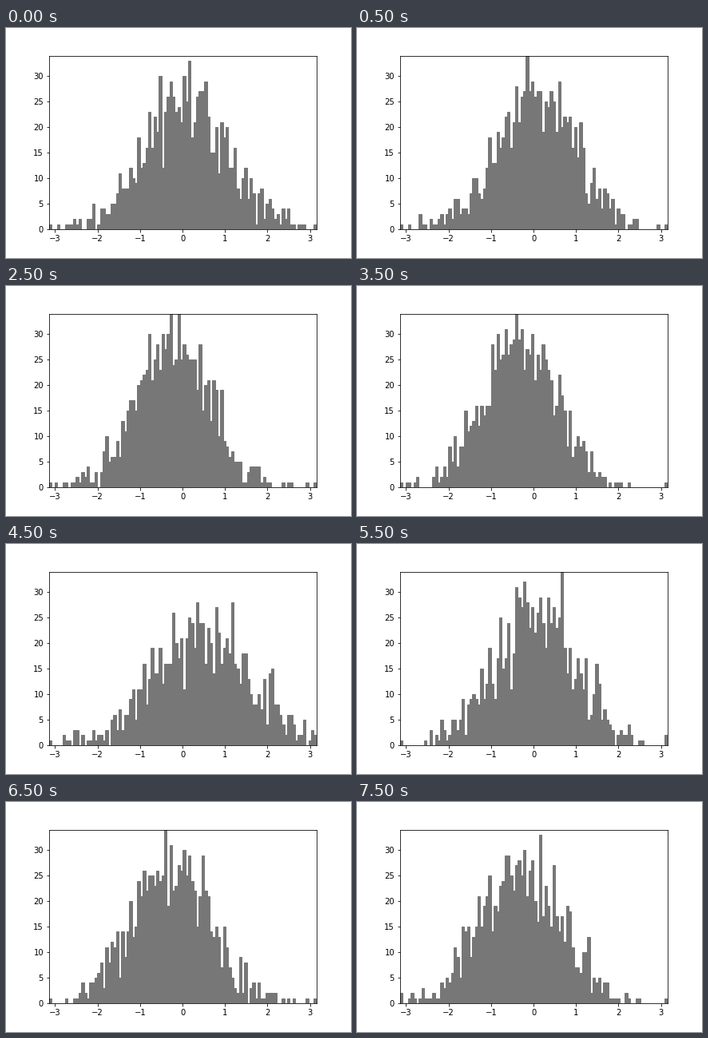
These frames come from a looping animation (432 by 288 pixels, 8 s). A matplotlib script:

```python
import numpy as np
import matplotlib.pyplot as plt
from matplotlib.animation import FuncAnimation
from matplotlib.patches import PathPatch
from matplotlib.path import Path

STEPS, STEP_MS = 16, 500
BINS, SAMPLES = 100, 1000
X_MIN, X_MAX, Y_MAX = -3.139, 3.154, 34
GREY = "#777777"

# Key points for how the bell drifts and widens over the loop.
KEY_STEPS = [0, 3, 7, 9, 11, 13, 15]
CENTERS = [0.13, -0.22, -0.30, 0.40, 0.03, -0.25, -0.28]
SPREADS = [1.00, 0.88, 0.88, 1.10, 0.93, 0.93, 0.94]

EDGES = np.linspace(X_MIN, X_MAX, BINS + 1)


def counts(step):
    """Bin counts of a fresh normal sample that touches both ends of the axis."""
    rng = np.random.RandomState(step)
    center = np.interp(step, KEY_STEPS, CENTERS)
    spread = np.interp(step, KEY_STEPS, SPREADS)
    sample = np.append(rng.normal(center, spread, SAMPLES), [X_MIN, X_MAX])
    return np.histogram(sample, EDGES)[0]


def bar_path():
    """One compound path of zero-height bars, five vertices per bar."""
    left, right = EDGES[:-1], EDGES[1:]
    base = np.zeros(BINS)
    corners = np.array([[left, left, right, right], [base] * 4]).T
    return Path.make_compound_path_from_polys(corners)


fig, ax = plt.subplots(figsize=(6, 4), dpi=72, facecolor="white")
fig.subplots_adjust(left=0.125, right=0.9, bottom=0.125, top=0.88)

bars = bar_path()
ax.add_patch(PathPatch(bars, facecolor=GREY, edgecolor=GREY, linewidth=1))
ax.set_xlim(X_MIN, X_MAX)
ax.set_ylim(0, Y_MAX)


def update(step):
    heights = counts(step)
    bars.vertices[1::5, 1] = heights
    bars.vertices[2::5, 1] = heights
    return ax.patches


anim = FuncAnimation(fig, update, frames=STEPS, interval=STEP_MS, repeat=True)
plt.show()
```
